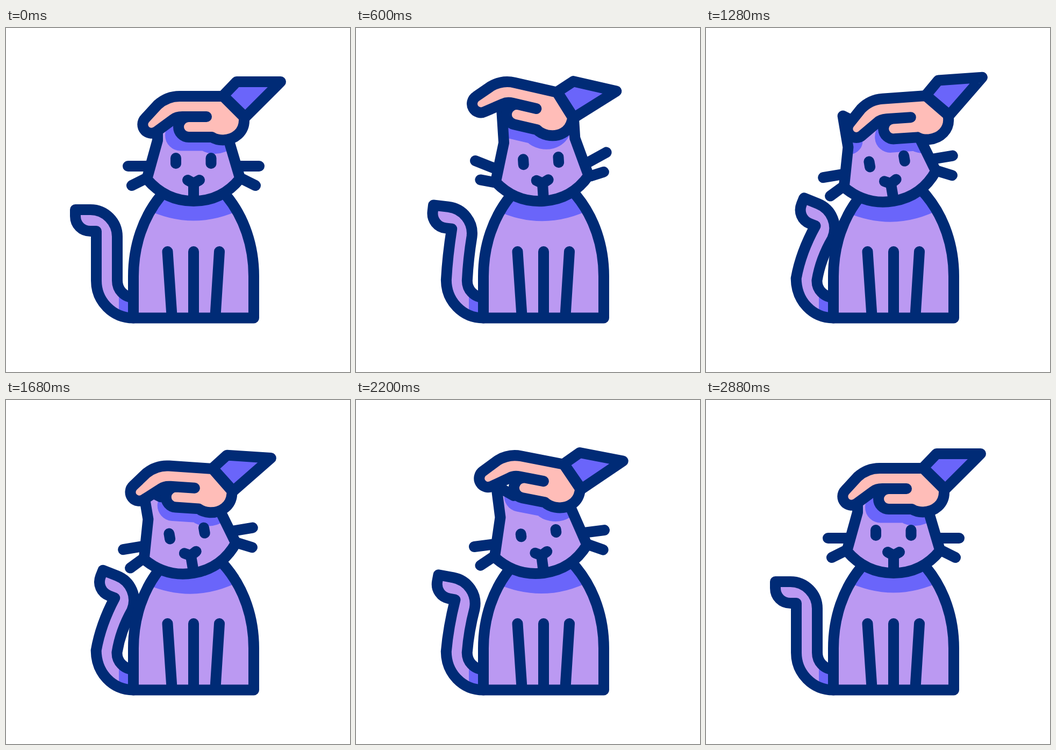
An HTML page that plays this animation: 640x640 px, repeating every 3000 ms.

```html
<!DOCTYPE html>
<html lang="en">
<head>
<meta charset="utf-8">
<title>Petting a cat</title>
<style>
  html, body { margin: 0; width: 100%; height: 100%; overflow: hidden; background: #fff; }
  svg { display: block; width: 100vw; height: 100vh; }
  .line { fill: none; stroke: #002b76; stroke-width: 20; stroke-linecap: round; stroke-linejoin: round; }
  .fur { fill: #bb99f2; }
  .shade { fill: #6a65fa; }
  .skin { fill: #ffbdb8; }
</style>
</head>
<body>
<svg viewBox="0 0 640 640">
  <defs>
    <path id="body" d="M294 305L288 312C255 352 237 405 237 462V539.5H461V462C461 405 443 352 410 312L404 305"/>
    <path id="head" d="M282 150V209L262 281C285 308 315 322 349 322C383 322 413 308 435.500 280L414.500 209V150L386 172H312Z"/>
    <path id="hand" d="M404 127H323C305 127 292 134 282 143L259 168A16.3 16.3 0 0 0 281 192L311 170C316 166 322 165 328 165H373H340A19 19 0 0 0 340 203H383C389 207 396 208.500 404 208.500C426 208 443 193 443 172V166Z"/>
    <path id="cuff" d="M429 100H511L445 166L404 126Z"/>
    <clipPath id="bodyClip"><use href="#body"/></clipPath>
    <clipPath id="headClip"><use href="#head"/></clipPath>
    <clipPath id="tailClip"><path class="tail"/></clipPath>
  </defs>

  <path class="tail fur"/>
  <rect class="shade" x="210" y="480" width="40" height="70" clip-path="url(#tailClip)"/>
  <path class="tail line"/>

  <use href="#body" class="fur"/>
  <g clip-path="url(#bodyClip)">
    <path id="collar" class="shade" d="M260 337Q349 380 438 337V290H260Z"/>
  </g>
  <use href="#body" class="line"/>
  <path class="line" d="M300.500 416L308.500 535M349 416V535M397 416L389.500 535"/>

  <g id="headGroup">
    <use href="#head" class="fur"/>
    <g clip-path="url(#headClip)">
      <g id="shadow" class="shade" stroke="#6a65fa" stroke-width="20" stroke-linejoin="round">
        <path d="M340 165A19 19 0 0 0 340 203H383C389 207 396 208.500 404 208.500C426 208 443 193 443 172L404 127H350Z"/>
        <circle cx="263" cy="186" r="15"/>
      </g>
    </g>
    <use href="#head" class="line"/>
    <path id="whiskers" class="line"/>
    <path id="eyes" class="line"/>
    <path class="line" d="M338 283L349 289L360 283M349 289V318"/>
  </g>

  <g id="handGroup">
    <use href="#cuff" class="shade"/>
    <use href="#hand" class="skin"/>
    <use href="#cuff" class="line"/>
    <use href="#hand" class="line"/>
  </g>
</svg>
<script>
const LOOP = 3000, STEP = 40, LAST = 2880;
const $ = id => document.getElementById(id);
const tails = document.querySelectorAll('.tail');

const clamp = u => Math.max(0, Math.min(1, u));
const ease = (t, from, to) => {
  const u = clamp((t - from) / (to - from));
  return u * u * (3 - 2 * u);
};
const pulse = (t, from, peak, to) => ease(t, from, peak) - ease(t, peak, to);

const restingTail = 'M237,539.5C198,539.5 168,508 168,470C168,440 168,410 168,378L157,378'
  + 'C141,378 129,366 129,350L129,338L157,338C185,338 207,361 207,388'
  + 'C207,415 207,445 207,470C207,488 220,500 237,502';

// Turns each point about the tail's root, more the higher it lies.
function bentTail(bend) {
  return restingTail.replace(/([\d.]+),([\d.]+)/g, (_, px, py) => {
    const weight = bend * clamp((500 - py) / 115);
    const a = weight * 23 * Math.PI / 180, x = px - 210, y = py - 458;
    return [210 + 2.5 * weight + x * Math.cos(a) - y * Math.sin(a),
            458 + x * Math.sin(a) + y * Math.cos(a)].map(v => v.toFixed(2)).join();
  });
}

// Two strokes: the hand pulls back along the head, then lifts, then tips.
function handPose(t) {
  const pull = pulse(t, 0, 600, 1080) + pulse(t, 1280, 1960, 2520);
  const lift = pulse(t, 240, 600, 980) + 1.2 * pulse(t, 1680, 2040, 2600);
  const tip = pulse(t, 100, 620, 1300) + pulse(t, 1480, 2040, 2680);
  const press = pulse(t, 960, 1280, 1600);
  return { dx: 6 * press - 32.5 * pull, dy: -10.5 * lift, turn: 13 * tip - 4 * press };
}

function draw(t) {
  const bend = bentTail(pulse(t, 140, 1440, LAST));
  tails.forEach(el => el.setAttribute('d', bend));

  const tilt = ease(t, 340, 960) - ease(t, 1880, LAST);
  const angle = -9.6 * tilt;
  $('headGroup').setAttribute('transform', `rotate(${angle} 349 320)`);
  $('collar').setAttribute('transform', `translate(0 ${2 * tilt}) rotate(${angle * 0.25} 349 320)`);

  const perk = 18 * pulse(t, 260, 600, 940);
  const whisker = (side, tip, tipY, base, baseY) =>
    `M${349 + side * tip} ${tipY - perk}L${349 + side * base} ${baseY}`;
  $('whiskers').setAttribute('d', [-1, 1].map(side =>
    whisker(side, 122, 257, 84, 257) + whisker(side, 115, 293, 91, 281)).join(''));

  const blink = pulse(t, 800, 960, 1120) + pulse(t, 2120, 2280, 2440);
  const open = 5 * (1 - blink) + 0.01;
  $('eyes').setAttribute('d', [316, 381.5].map(x => `M${x} ${247 - open}V${247 + open}`).join(''));

  const { dx, dy, turn } = handPose(t);
  const place = (x, y) => `translate(${dx + x} ${dy + y}) rotate(${turn} 390.5 140)`;
  $('handGroup').setAttribute('transform', place(0, 0));
  // The shadow lives inside the head, so undo the head's tilt first.
  $('shadow').setAttribute('transform', `rotate(${-angle} 349 320) ` + place(-6 - 9 * (1 - tilt), 15.5));
}

const start = performance.now();
function tick() {
  const t = (performance.now() - start) % LOOP;
  draw(Math.min(Math.floor(t / STEP) * STEP, LAST));
  requestAnimationFrame(tick);
}
tick();
</script>
</body>
</html>
```
